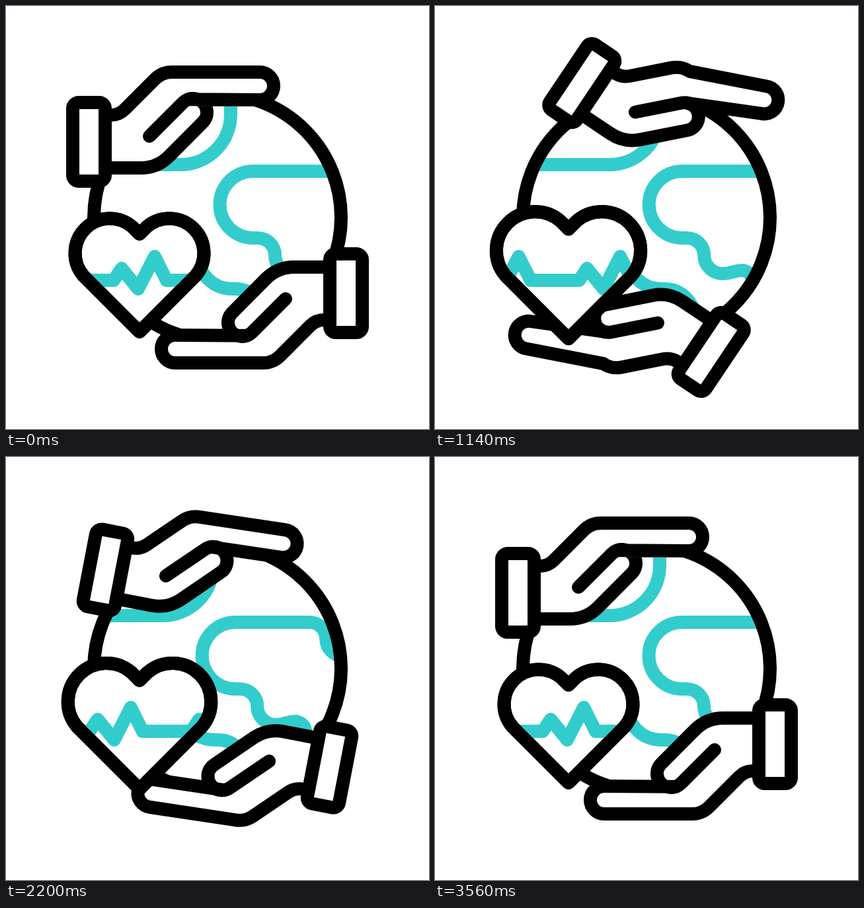
These frames come from a looping animation (640 px wide and 640 px high, 3.6 s). An HTML page with a canvas:

```html
<!DOCTYPE html>
<html lang="en">
<head>
<meta charset="utf-8">
<title>Hands around the globe</title>
<style>
html, body { margin: 0; width: 100%; height: 100%; overflow: hidden; background: #fff; }
canvas { display: block; }
</style>
</head>
<body>
<canvas id="stage" width="640" height="640"></canvas>
<script>
const ctx = document.getElementById('stage').getContext('2d');
const LOOP = 3600, END = 3560, CENTER = 320, DEG = Math.PI / 180;
const BLACK = '#000', WHITE = '#fff', TEAL = '#33cccc';

const clamp = x => Math.max(0, Math.min(1, x));
const smooth = x => x * x * (3 - 2 * x);

// Ease like CSS cubic-bezier(x1, 0, x2, 1).
const bezier = (x1, x2) => x => {
  let lo = 0, hi = 1;
  for (let i = 0; i < 20; i++) {
    const u = (lo + hi) / 2;
    if (3 * u * (1 - u) * (x1 * (1 - u) + x2 * u) + u ** 3 < x) lo = u; else hi = u;
  }
  return smooth(lo);
};

// Eases through [time, value, ease into the next key].
function tween(keys, t) {
  const i = keys.findIndex(([time]) => time > t);
  if (i < 0) return keys[keys.length - 1][1];
  const [t0, v0, ease = smooth] = keys[i - 1], [t1, v1] = keys[i];
  return v0 + (v1 - v0) * ease((t - t0) / (t1 - t0));
}

const turn = [
  [0, 0, bezier(.336, .553)],
  [1400, 36, bezier(.38, .77)],
  [2760, -10, bezier(.29, .33)],
  [END, 0]
];
// Each swing of the land lasts a little longer than the one before.
const swing = [0, 46, -42, 52, -29, 0].map((x, k) => [40 * k * (k + 9), x]);
// The heart shrinks and swells in turn.
const beat = [
  [0, 1],
  ...[450, 1130, 1780, 2150, 2530, 2980].map((t, i) => [t, i % 2 ? 1.12 : .93]),
  [END, 1]
];
const fingerBend = t => smooth(clamp(t / 1060)) - smooth(clamp((t - 1400) / 1010));

const land = new Path2D(`
  M340 100V164A76 76 0 0 1 264 240H142A22 22 0 0 1 120 218V100
  M620 301H537A26 26 0 0 1 511 275A25 25 0 0 0 486 250H374A50.5 50.5 0 0 0 374 351
  H381A26 26 0 0 1 407 377A28 28 0 0 0 435 405C450 405 452 400 464 400A16 16 0 0 1 480 416V470
  M60 301H98A28 28 0 0 1 126 329Q126 344 142 344H258A32 32 0 0 1 290 376
  A52 52 0 0 0 342 428H347A46 46 0 0 1 393 474`);
const heartShape = new Path2D(
  'M0 -62L-11 -73A52.5 52.5 0 0 0 -85 1L0 86L85 1A52.5 52.5 0 0 0 11 -73Z');
const globe = new Path2D();
globe.arc(CENTER, CENTER, 187, 0, 2 * Math.PI);
const cuff = new Path2D();
cuff.roundRect(101, 146, 49, 119, 9);
const thumb = new Path2D('M217 197L268 146A21 21 0 0 1 283 140');

function line(path, color = BLACK) {
  ctx.strokeStyle = color;
  ctx.stroke(path);
}

function shape(path) {
  ctx.fillStyle = WHITE;
  ctx.fill(path);
  line(path);
}

function inside(outline, paint) {
  ctx.save();
  ctx.clip(outline);
  paint();
  ctx.restore();
  line(outline);
}

function drawGlobe(shift) {
  inside(globe, () => {
    ctx.translate(shift, 0);
    line(land, TEAL);
  });
}

function palm(bend) {
  const path = new Path2D(), tilt = -24 * DEG * bend, quarter = Math.PI / 2;
  path.moveTo(150, 165);
  path.arcTo(171, 165, 236, 100, 29);
  path.arcTo(236, 100, 251, 100, 36);
  path.arc(384 - 15 * bend, 121 - 48 * bend, 21, tilt - quarter, tilt + quarter);
  path.arc(283, 161, 21, -1.9, quarter / 2);
  path.arcTo(229, 245, 204, 245, 60);
  path.lineTo(150, 245);
  return path;
}

function drawHand(angle, bend) {
  ctx.save();
  ctx.translate(CENTER, CENTER);
  ctx.rotate(angle * DEG);
  ctx.translate(-CENTER, -CENTER);
  shape(palm(bend));
  line(thumb);
  shape(cuff);
  ctx.restore();
}

function drawHeart(scale, t) {
  const heart = new Path2D(), pulse = new Path2D(), period = 153.5;
  heart.addPath(heartShape, new DOMMatrix([scale, 0, 0, scale, 202, 407]));
  for (let i = -1; i < 4; i++) {
    const x = 163 + period * (i - 2 * t / END);
    for (const [dx, y] of [[0, 415], [12, 397], [37, 428], [62, 379], [80, 415]]) pulse.lineTo(x + dx, y);
  }
  shape(heart);
  inside(heart, () => line(pulse, TEAL));
}

function draw() {
  const t = Math.min(performance.now() % LOOP, END);
  const angle = tween(turn, t), bend = fingerBend(t);
  ctx.fillStyle = WHITE;
  ctx.fillRect(0, 0, 640, 640);
  ctx.lineWidth = 20;
  ctx.lineCap = ctx.lineJoin = 'round';
  drawGlobe(tween(swing, t));
  drawHand(angle, bend);
  drawHand(angle + 180, bend);
  drawHeart(tween(beat, t), t);
  requestAnimationFrame(draw);
}
draw();
</script>
</body>
</html>
```
